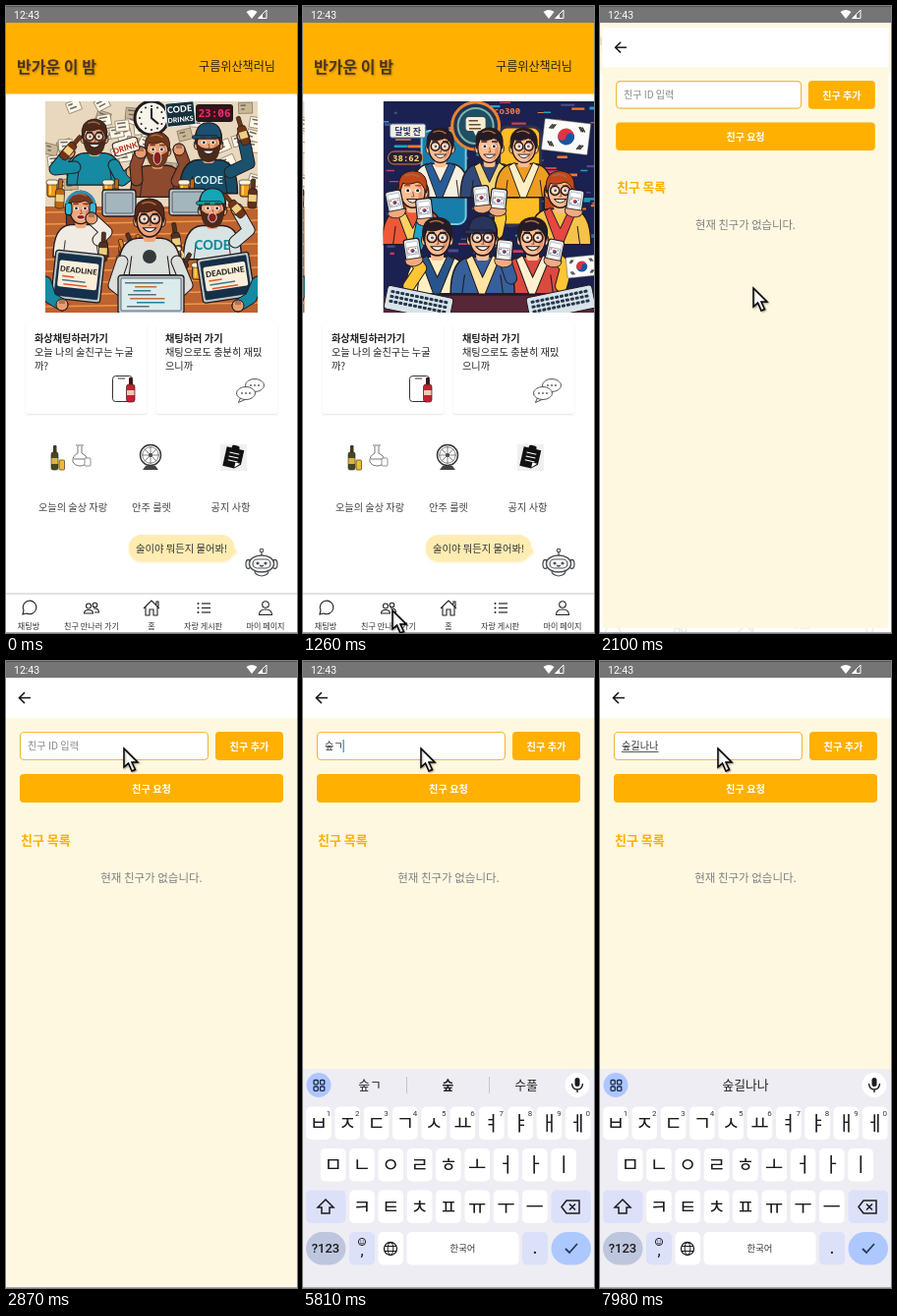
These frames come from a looping animation (296 by 638 pixels, 8 s). An HTML page with a canvas:

```html
<!DOCTYPE html>
<html lang="ko">
<head>
<meta charset="utf-8">
<style>
html, body { margin: 0; width: 100%; height: 100%; overflow: hidden; background: #fff; }
canvas { display: block; width: 296px; height: 638px; }
</style>
</head>
<body>
<canvas id="stage"></canvas>
<script>
const W = 296, H = 638, LOOP = 8000, STEP = 70;
const canvas = document.getElementById('stage');
const dpr = Math.max(1, window.devicePixelRatio || 1);
canvas.width = W * dpr;
canvas.height = H * dpr;
const c = canvas.getContext('2d');
const KR = '"Noto Sans CJK KR", "Noto Sans CJK", "Noto Sans", sans-serif';
const ROBOTO = 'Roboto, sans-serif', LATO = 'Lato, sans-serif', MONO = '"Noto Sans Mono", monospace';
const ORANGE = '#ffb000', CREAM = '#fff8e1', INK = '#241a1c';

const clamp = v => Math.max(0, Math.min(1, v));
const progress = (t, a, b) => clamp((t - a) / (b - a));
const easeOut = (p, n) => 1 - (1 - p) ** n;

function paint(fill, stroke, lw = 1) {
  if (fill) { c.fillStyle = fill; c.fill(); }
  if (stroke) { c.strokeStyle = stroke; c.lineWidth = lw; c.stroke(); }
}
function box(x, y, w, h, r, fill, stroke, lw) {
  c.beginPath(); c.roundRect(x, y, w, h, r); paint(fill, stroke, lw);
}
function oval(x, y, rx, ry, fill, stroke, lw) {
  c.beginPath(); c.ellipse(x, y, rx, ry, 0, 0, 7); paint(fill, stroke, lw);
}
const dot = (x, y, r, fill, stroke, lw) => oval(x, y, r, r, fill, stroke, lw);
function poly(pts, fill, stroke, lw, open) {
  c.beginPath();
  for (let i = 0; i < pts.length; i += 2) c.lineTo(pts[i], pts[i + 1]);
  if (!open) c.closePath();
  paint(fill, stroke, lw);
}
const line = (pts, color, lw = 1) => poly(pts, null, color, lw, true);
function path(d, fill, stroke, lw) {
  const p = new Path2D(d);
  if (fill) { c.fillStyle = fill; c.fill(p); }
  if (stroke) { c.strokeStyle = stroke; c.lineWidth = lw || 1; c.stroke(p); }
}
function text(s, x, y, size, color, align = 'left', weight = 400, family = KR) {
  c.font = `${weight} ${size}px ${family}`;
  c.textAlign = align;
  c.fillStyle = color;
  c.fillText(s, x, y);
}
function at(x, y, draw, scale = 1, turn = 0) {
  c.save(); c.translate(x, y); c.rotate(turn); c.scale(scale, scale); draw(); c.restore();
}
function shadowed(color, blur, dx, dy, draw) {
  c.save();
  c.shadowColor = color; c.shadowBlur = blur * dpr;
  c.shadowOffsetX = dx * dpr; c.shadowOffsetY = dy * dpr;
  draw();
  c.restore();
}
function seeded(n) {
  return () => (n = (n * 16807) % 2147483647) / 2147483647;
}

// ---- Illustrations, each 216 x 216 ----
function person(x, y, r, o) {
  at(x, y, () => {
    const skin = o.skin || '#f0a67b', hair = o.hair || '#4a2a1c';
    if (o.long) box(-13, -10, 26, 33, 10, hair, INK);
    path('M-25 43 Q-25 15 -9 14 L9 14 Q25 15 25 43Z', o.shirt, INK, 1.2);
    line([-16, 43, -14, 28], INK, .8); line([16, 43, 14, 28], INK, .8);
    if (o.collar) poly([-8, 13, 0, 30, 8, 13, 13, 16, 2, 43, -3, 43, -13, 16], o.collar, INK, .8);
    box(-5, 7, 10, 10, 3, skin);
    oval(-10, 1, 2.5, 4, skin, INK, .8); oval(10, 1, 2.5, 4, skin, INK, .8);
    oval(0, 0, 10, 13, skin, INK, 1.2);
    path('M3 -10 Q9 -4 8 5 Q5 10 3 11 Q7 0 3 -10Z', '#b8593b66');
    if (o.beard) path('M-10 0 Q-10 16 0 16 Q10 16 10 0 Q5 5 0 4 Q-5 5 -10 0Z', hair);
    path('M-11 1 Q-14 -16 0 -17 Q14 -16 11 1 Q8 -7 4 -8 Q-4 -5 -8 -7Z', hair, INK, .8);
    path('M-6 -13 Q0 -16 5 -12', null, '#ad6c3c', 1.2);
    if (o.hat) {
      path('M-11 -5 Q-11 -18 0 -18 Q11 -18 11 -5Z', o.hat, INK, 1);
      box(-14, -7, 22, 3, 1.5, o.hat, INK, .7);
    }
    line([0, 0, 1, 4, -1, 4], '#944f32', .8);
    for (const s of [-1, 1]) {
      oval(s * 4, -1, 2.3, 1.7, '#fff'); dot(s * 4, -1, 1.2, INK);
      line([s * 2, -5, s * 7, -5], hair, 1.3);
      if (o.glasses) dot(s * 4.3, -1, 3.7, '#ffffff44', INK, 1.2);
      if (o.phones) box(s * 11 - 3, -6, 6, 11, 3, '#38b6da', INK);
    }
    if (o.phones) { c.beginPath(); c.arc(0, -3, 13, 3.3, 6.1); paint(null, '#2f91b6', 2.5); }
    if (o.mouth) oval(0, 7, 3.6, o.mouth, '#8b1d20', '#fff', .7);
    else path('M-5 6 Q0 12 5 6Z', '#fff', INK, .8);
    if (o.word) text(o.word, 0, 35, 9, '#d9f4ee', 'center', 700, LATO);
  }, r);
}
function arm(pts, sleeve, skin = '#e89d70') {
  c.save();
  c.lineCap = c.lineJoin = 'round';
  line(pts, INK, 13); line(pts, sleeve, 11);
  c.restore();
  const [x, y] = pts.slice(-2);
  dot(x, y, 6, skin, INK, 1);
  for (let i = -2; i < 3; i += 2) line([x + i, y - 5, x + i, y - 1], INK, .6);
}
function mug(x, y) {
  dot(x + 9, y + 7, 4, null, '#f3d49a', 2);
  box(x, y, 10, 15, 2, '#f39a18', INK);
  box(x + 2, y + 3, 2, 10, 1, '#ffd16a');
  box(x - 1, y - 2, 12, 5, 3, '#fff3d5', INK, .6);
}
function bottle(x, y, turn, color = '#713415') {
  at(x, y, () => {
    box(-2, -14, 4, 12, 1, color, INK, .7);
    box(-4.5, -4, 9, 20, 3, color, INK, .7);
    box(-4, 2, 8, 7, 0, '#efcf83');
  }, 1, turn);
}
function laptop(x, y, w, h, turn, screen, color = '#14304a') {
  at(x, y, () => {
    box(0, 0, w, h, 3, '#b8cbd2', INK, 1.3);
    box(3, 3, w - 6, h - 6, 1, color, INK, .6);
    screen(w, h);
  }, 1, turn);
}
function codeLines(x, y, w, rows, seed, colors) {
  const rnd = seeded(seed);
  for (let i = 0; i < rows; i++) {
    const indent = rnd() * w * .25;
    box(x + indent, y + i * 4, (w - indent) * (.35 + rnd() * .6), 1.5, 0, colors[i % colors.length]);
  }
}
function deadline(w, h) {
  box(5, h * .2, w - 10, h * .55, 2, '#fbefda');
  text('DEADLINE', w / 2, h * .43, w / 6.6, '#232323', 'center', 800, LATO);
  codeLines(9, h * .51, w - 18, 3, 8, ['#e0562e', '#397b90']);
}
function drinksScene() {
  box(0, 0, 216, 216, 0, '#e9d8bd');
  const rnd = seeded(42);
  for (let i = 0; i < 45; i++) {
    const x = rnd() * 210, y = rnd() * 80;
    at(x, y, () => {
      box(0, 0, 14, 11, 0, i % 3 ? '#fff6e4' : '#cbb694', '#6d6258', .6);
      codeLines(2, 2, 10, 2, i + 9, ['#6b6868']);
    }, 1, rnd() - .5);
  }
  dot(108, 17, 17, '#f7f4ea', INK, 3);
  for (let a = 0; a < 12; a++) dot(108 + 12 * Math.sin(a * Math.PI / 6), 17 + 12 * Math.cos(a * Math.PI / 6), 1, INK);
  line([108, 7, 108, 17, 115, 23], INK, 2);
  at(137, 13, () => {
    box(-14, -12, 29, 24, 1, '#17303b', '#eee', 1);
    text('CODE', 0, -2, 9, '#fff', 'center', 800, LATO);
    text('DRINKS', 0, 8, 7, '#fff', 'center', 800, LATO);
  }, 1, -.1);
  box(154, 4, 36, 16, 2, '#391119', INK, 2);
  text('23:06', 172, 16, 11, '#e92f6d', 'center', 700, MONO);
  person(50, 37, 1.12, { shirt: '#168aa2', beard: 1, glasses: 1 });
  arm([30, 67, 10, 69, 24, 52], '#168aa2');
  bottle(27, 46, .7);
  arm([70, 65, 78, 80, 88, 72], '#168aa2');
  person(114, 50, 1.1, { shirt: '#8d4a2e', mouth: 6, hair: '#703719', beard: 1 });
  arm([93, 80, 92, 65, 97, 52], '#8d4a2e');
  arm([134, 81, 142, 65, 136, 49], '#8d4a2e');
  person(166, 43, 1.18, { shirt: '#174c68', hat: '#1c4f70', beard: 1, word: 'CODE' });
  arm([188, 72, 207, 63, 201, 35], '#1a526e');
  bottle(200, 29, -.3);
  at(82, 46, () => {
    box(-13, -7, 26, 14, 3, '#fff9e6', INK);
    text('DRINK!', 0, 4, 8, '#b22e22', 'center', 800, LATO);
  }, 1, -.3);
  box(0, 107, 216, 109, 0, '#bd6330');
  for (let y = 113; y < 216; y += 12) line([0, y, 216, y - 4], y % 24 ? '#ee9849' : '#7a3920', 1.5);
  for (const x of [2, 59, 136, 198]) { mug(x, 82); bottle(x + 13, 93, .05, x % 3 ? '#b86b15' : '#613019'); }
  laptop(58, 90, 34, 27, 0, () => {}, '#a3b6be');
  laptop(126, 89, 37, 27, 0, () => {}, '#a3b6be');
  person(36, 110, 1.12, { shirt: '#f0ece3', phones: 1, long: 1, hair: '#7b361d', mouth: 2 });
  arm([54, 141, 62, 133, 47, 119], '#f0ece3');
  person(170, 110, 1.18, { shirt: '#d7e4e3', hat: '#13a6b6', beard: 1, mouth: 4 });
  text('CODE', 170, 151, 13, '#15899a', 'center', 800, LATO);
  arm([193, 143, 207, 131, 195, 110], '#d7e4e3');
  bottle(191, 105, -.7);
  for (let i = 0; i < 16; i++) {
    const x = 58 + rnd() * 95, y = 132 + rnd() * 43;
    i % 3 ? bottle(x, y, rnd() - .5, i % 2 ? '#e28820' : '#51321f') : mug(x, y);
  }
  person(106, 121, 1.3, { shirt: '#dce0dd', glasses: 1, hair: '#582918' });
  dot(106, 158, 7, '#34393b');
  arm([78, 163, 70, 187, 84, 198], '#dce0dd');
  arm([134, 163, 144, 187, 132, 198], '#dce0dd');
  laptop(11, 151, 50, 49, .11, deadline);
  laptop(154, 161, 53, 45, -.15, deadline);
  laptop(74, 177, 67, 39, 0, (w, h) => codeLines(7, 7, w - 15, 7, 5, ['#56727d', '#c16d32', '#267f9b']), '#dcebec');
  arm([0, 184, 5, 200, 17, 207], '#168aa2');
  arm([216, 184, 209, 200, 196, 208], '#168aa2');
}
function flag(x, y, w, turn = 0) {
  at(x, y, () => {
    const h = w * .68, r = w * .18;
    box(-w / 2, -h / 2, w, h, 1, '#fbfbf8', '#555', .5);
    c.beginPath(); c.arc(0, 0, r, Math.PI, 0); paint('#df3443');
    c.beginPath(); c.arc(0, 0, r, 0, Math.PI); paint('#1b55a0');
    dot(-r / 2, 0, r / 2, '#df3443'); dot(r / 2, 0, r / 2, '#1b55a0');
    for (const sx of [-1, 1]) for (const sy of [-1, 1])
      for (let k = -1; k < 2; k++)
        at(sx * w * .32 + k * w * .035, sy * h * .28, () => box(-.4, -h * .09, w * .025, h * .18, 0, '#202020'), 1, sx * sy * .6);
  }, 1, turn);
}
function flagPhone(x, y, turn) {
  at(x, y, () => {
    box(-8, -13, 16, 26, 3, '#e9edf0', INK, 1.2);
    box(-6, -10, 12, 20, 1, '#fff', '#879aad', .5);
    flag(0, -1, 11);
    path('M-9 7 Q-10 14 0 15 Q10 14 9 7Z', '#f0aa80', INK, .8);
  }, 1, turn);
}
function friendsScene() {
  box(0, 0, 216, 216, 0, '#1b2150');
  const rnd = seeded(77), neon = ['#24a2bd', '#ef7a35', '#4e4c8a', '#c64358'];
  for (let i = 0; i < 130; i++) box(rnd() * 216, rnd() * 155, 3 + rnd() * 14, 1 + rnd() * 2, 0, neon[i % 4]);
  box(39, 30, 45, 95, 8, '#197dac', '#74cce0', 2);
  box(118, 26, 42, 100, 8, '#ffbd25', '#32314b', 3);
  dot(94, 25, 24, '#24334f', '#e98435', 3);
  dot(94, 25, 18, '#214e61', '#79b7b3', 2);
  box(84, 16, 20, 14, 3, '#f6ecd2'); poly([91, 29, 97, 29, 94, 35], '#f6ecd2');
  codeLines(87, 19, 14, 3, 4, ['#694c35']);
  text('co300', 126, 13, 9, '#ff753d', 'center', 700, MONO);
  box(7, 23, 36, 14, 2, '#f6efdd', '#5775b4');
  text('달빛 잔', 25, 34, 9, '#263765', 'center', 700);
  box(5, 51, 35, 13, 6, '#291f35', '#e37c39');
  text('38:62', 23, 61, 9, '#ffd66e', 'center', 700, MONO);
  flag(186, 36, 47, .12);
  const group = (list, y, r) => list.forEach(([x, shirt, collar, long, glasses, hat]) =>
    person(x, y, r, { shirt, collar, long, glasses, hat, skin: '#ffbd91', hair: long ? '#c3471b' : '#251b26' }));
  group([[58, '#f5f0df', '#285c98', 0, 1], [108, '#314978', '#f3d47a', 0, 0], [143, '#ee9d21', '#fff0c3', 0, 1]], 47, 1.18);
  group([[30, '#ee5937', '#ffd262', 1, 0], [180, '#f5c34a', '#e74642', 1, 1]], 92, 1.25);
  arm([35, 147, 39, 127, 42, 115], '#22a2c8'); flagPhone(42, 112, -.1);
  arm([116, 134, 119, 119, 117, 106], '#ffcb3a'); flagPhone(117, 102, .1);
  flagPhone(100, 99, -.1); flagPhone(195, 103, .15); flagPhone(12, 104, -.2);
  group([[55, '#fff0c4', '#28548d', 0, 1], [152, '#da4a40', '#fff0cf', 0, 1], [101, '#365f9c', '#ffe4a2', 0, 1, '#29345d']], 140, 1.3);
  arm([26, 188, 38, 170, 29, 157], '#ffc535'); flagPhone(30, 153, -.15);
  arm([130, 180, 126, 168, 123, 157], '#365f9c'); flagPhone(123, 154, .1);
  arm([181, 188, 186, 169, 174, 157], '#ffc535'); flagPhone(174, 154, .2);
  flag(202, 168, 31, -.1);
  box(0, 198, 216, 18, 0, '#572637');
  for (const [x, turn] of [[5, .2], [145, -.2]])
    at(x, turn > 0 ? 187 : 200, () => {
      box(0, 0, 68, 24, 3, '#d8e3ea', INK);
      for (let i = 0; i < 36; i++) box(4 + (i % 12) * 5, 4 + Math.floor(i / 12) * 5, 4, 3, 1, '#253649');
    }, 1, turn);
}

// ---- Home ----
function bubble(x, y, rx, ry) {
  oval(x, y, rx, ry, '#fff', '#555', 1);
  line([x - rx * .6, y + ry * .8, x - rx * .8, y + ry + 3, x - rx * .1, y + ry], '#555', 1);
  for (let i = -1; i < 2; i++) dot(x + i * 4, y, .9, '#555');
}
function homeIcons() {
  box(108.5, 376.5, 20, 26, 3, '#fff', '#333', 1);
  line([114, 379, 121, 379], '#333', 1);
  box(125, 378, 3.5, 9, 1, '#3c1519'); box(122.5, 385, 8.5, 18, 2.5, '#c51f32', '#4c171c', .7);
  box(123, 391, 7.5, 5, 0, '#f2c8b0');
  bubble(253, 386, 9.5, 6.5); bubble(244, 394, 9.5, 6.5);
  box(48, 447, 3.5, 9, 1, '#47371d'); box(46, 454, 7, 18, 2, '#4b4820', '#222', .6);
  box(46.3, 460, 6.4, 6, 0, '#d9b545'); box(54, 462, 5.5, 10, 1, '#efbd31', '#5c4a24', .8);
  path('M71 447 H79 M73 448 V455 Q67 458 68 464 Q70 468 75 468 Q82 468 83 462 Q82 457 77 455 V448 M69 461 H82', null, '#777', 1);
  box(80, 460, 6, 8, 1, '#fff', '#777', .8);
  dot(147, 457, 10.5, '#fff', '#333', 1.4); dot(147, 457, 8.2, null, '#555', .7); dot(147, 457, 2, '#333');
  for (let i = 0; i < 8; i++) {
    const a = i * Math.PI / 4;
    line([147, 457, 147 + 9 * Math.cos(a), 457 + 9 * Math.sin(a)], '#555', .7);
  }
  poly([142, 468, 152, 468, 155, 472, 139, 472], '#444');
  box(218, 446, 27, 27, 0, '#f0f0f0');
  at(231.5, 459, () => {
    poly([-9, -9, 9, -9, 9, 6, 3, 11, -9, 11], '#111');
    box(-4, -12, 8, 5, 2, '#111');
    for (const y of [-4, 0, 4]) line([-5, y, 5, y], '#fff', 1);
    poly([3, 5, 8, 5, 3, 10], '#fff');
  }, 1, .22);
}
function robot() {
  const g = '#4b5054';
  line([260, 555, 260, 560], g, 1.3); dot(260, 554, 1.8, '#fff', g, 1.1);
  oval(246.5, 568, 2.5, 4.5, '#fff', g, 1.3); oval(273.5, 568, 2.5, 4.5, '#fff', g, 1.3);
  oval(260, 567.5, 12.5, 8.5, '#fff', g, 1.5);
  box(251, 563, 18, 9, 4.5, '#fff', g, 1.2);
  dot(256, 567, 1.6, g); dot(264, 567, 1.6, g);
  path('M258 569 Q260 571 262 569 M253 575 Q253 579 260 580 Q267 579 267 575', null, g, 1.2);
}
function tabBar() {
  box(0, 598, W, 40, 0, '#fff');
  line([0, 598, W, 598], '#d8d8d8', 1.5);
  const k = '#222';
  path('M17 619 L18 615 A6.800 6.800 0 1 1 21 618 Z', null, k, 1.1);
  dot(84, 610.5, 2.5, null, k, 1.1); dot(90.5, 609.5, 2.3, null, k, 1.1);
  path('M79.5 618 Q79.5 614.5 84 614.5 Q88.5 614.5 88.5 618Z M89 613 Q94.5 612.5 94.5 617 H90', null, k, 1.1);
  path('M140 613 L148 605 L156 613 M142 611 V620 H146 V614 H150 V620 H154 V611 M153 609 V606 H155 V611', null, k, 1.1);
  for (const y of [608, 612.5, 617]) { dot(195.5, y, 1, k); line([199, y, 208, y], k, 1.2); }
  dot(264, 609, 3.3, null, k, 1.1);
  path('M257.5 619.5 Q257.5 614 264 614 Q270.5 614 270.5 619.500Z', null, k, 1.1);
  [['채팅방', 23], ['친구 만나러 가기', 87], ['홈', 148], ['자랑 게시판', 200.5], ['마이 페이지', 264]]
    .forEach(([s, x]) => text(s, x, 634, 8.1, '#333', 'center'));
}
function home(t) {
  box(0, 0, W, H, 0, '#fff');
  box(0, 17, W, 72.5, 0, ORANGE);
  shadowed('#0004', 2, 1, 1, () => text('반가운 이 밤', 11, 68, 16, '#4b3423', 'left', 700));
  text('구름위산책러님', 196, 66, 12.1, '#2b2010');
  const slide = 296 * easeOut(progress(t, 910, 1470), 2);
  [drinksScene, friendsScene].forEach((scene, i) => {
    const x = 40 + i * 296 - slide;
    if (x > W || x < -216) return;
    at(x, 97, () => { c.beginPath(); c.rect(0, 0, 216, 215); c.clip(); scene(); });
  });
  for (const x of [20, 153]) shadowed('#0000001c', 2, 0, 1, () => box(x, 323, 123, 92, 2, '#fff'));
  const lines = (x, rows) => rows.forEach((s, i) => text(s, x, 342 + i * 14, 10.2, '#222', 'left', i ? 400 : 700));
  lines(29, ['화상채팅하러가기', '오늘 나의 술친구는 누굴', '까?']);
  lines(162, ['채팅하러 가기', '채팅으로도 충분히 재밌', '으니까']);
  homeIcons();
  [['오늘의 술상 자랑', 68], ['안주 룰렛', 148], ['공지 사항', 228.5]].forEach(([s, x]) => text(s, x, 514, 10.2, '#444', 'center'));
  shadowed('#ffecb3', 3, 0, 1, () => {
    box(125, 538, 107, 27, 13, '#ffecb3');
    poly([229, 547, 235, 556, 229, 559], '#ffecb3');
  });
  text('술이야 뭐든지 물어봐!', 132, 556, 10.3, '#333');
  robot();
  tabBar();
}

// ---- Friends ----
// time, typed text, suggestions
const typing = [
  [4480, 'ㅅ', ['ㅅ', '사', '수']], [5320, '수', ['수', '수도', '수고']], [5600, '숲', ['숲', '숲을', '숲에서']],
  [5810, '숲ㄱ', ['숲ㄱ', '숲', '수풀']], [6020, '숲기', ['숲기', '숲길', '숲이']], [6160, '숲길', ['숲길', '숲길을', '숲길에']],
  [6650, '숲길ㄴ'], [6860, '숲길나'], [7140, '숲길나ㄴ'], [7280, '숲길나나']
];
const typedAt = t => typing.filter(k => k[0] <= t).pop();

function friends(t) {
  box(0, 17, W, 621, 0, CREAM);
  box(0, 17, W, 41, 0, '#fff');
  line([25, 37.5, 13.5, 37.5], '#111', 1.5);
  line([19, 32, 13.5, 37.5, 19, 43], '#111', 1.5);
  box(14.5, 72.5, 191, 28, 4, '#fff', '#f2b943', 1.2);
  const typed = typedAt(t);
  let caretX = 22.5;
  if (typed) {
    text(typed[1], 22, 90, 10.2, '#333');
    const w = c.measureText(typed[1]).width;
    caretX += w;
    if (t >= 6650) line([22, 92.5, 22 + w, 92.5], '#555', 1);
  } else text('친구 ID 입력', 22, 90, 10.2, '#888');
  const caretOn = typed ? t - typed[0] < 560 : (t >= 3220 && t < 3780) || t >= 4270;
  if (caretOn) line([caretX, 80, caretX, 93], '#5f9fc4', 1.5);
  box(213, 72, 69, 29, 4, ORANGE);
  text('친구 추가', 247.5, 91, 10.2, '#fff', 'center', 700);
  box(14, 115, 268, 29, 4, ORANGE);
  text('친구 요청', 148, 134, 10.2, '#fff', 'center', 700);
  text('친구 목록', 15, 187, 13, ORANGE, 'left', 700);
  text('현재 친구가 없습니다.', 148, 225, 11.5, '#808080', 'center');
}

function toolbar() {
  const g = '#9a9aa2', k = '#25252b';
  path('M54 425 H67 V434 L62 439 H54Z M62 439 V434 H67', null, g, 1.4);
  dot(58, 430, 1, g); dot(63, 430, 1, g); path('M57 433 Q60 437 63 433', null, g, 1.2);
  text('GIF', 104, 436, 11, g, 'center', 800, ROBOTO);
  box(142.5, 426, 11, 13, 1, null, k, 1.6); box(145, 424, 6, 4, 1, k);
  for (const y of [431, 434]) line([145, y, 151, y], k, 1.2);
  for (let i = 0; i < 4; i++) at(192, 432, () => box(-1.7, -7, 3.4, 14, 1, k), 1, i * Math.PI / 4);
  dot(192, 432, 5, k); dot(192, 432, 2.2, '#eeedf4');
  dot(236, 432, 7, k);
  for (const [x, y] of [[232, 432], [234, 428.5], [238, 428.5], [240, 432]]) dot(x, y, 1.1, '#eeedf4');
  dot(239, 437.5, 2.5, '#eeedf4');
}
function suggestions([, word, options]) {
  if (!options) return text(word, 148, 436, 12.8, '#222', 'center');
  options.forEach((s, i) => text(s, 68 + i * 79.5, 436, 12.8, '#222', 'center', i === 1 ? 700 : 400));
  for (const x of [105.5, 189.5]) line([x, 423, x, 440], '#c4c4cc', 1);
}
function keyRow(keys, firstX, y, numbered) {
  [...keys].forEach((s, i) => {
    const x = firstX + i * 29.3;
    box(x - 12.8, y, 25.6, 33.5, 5, '#fff');
    text(s, x, y + 24, 20, '#1b1b20', 'center');
    if (numbered) text((i + 1) % 10, x + 10, y + 9, 8, '#333', 'center', 400, ROBOTO);
  });
}
function keyboard(t) {
  const pale = '#dce1f9', k = '#1b1b20';
  box(0, 415, W, 223, 0, '#eeedf4');
  dot(16, 431.5, 12.5, '#adc6ff');
  for (const x of [11, 17.5]) for (const y of [426.5, 433]) box(x, y, 4.3, 4.3, 1, null, '#1d2b4c', 1.3);
  dot(279, 431.5, 12.5, '#fff');
  box(276.5, 424, 5, 9, 2.5, k);
  path('M273.5 430 Q274 436 279 436 Q284 436 284.5 430 M279 436 V439', null, k, 1.4);
  const typed = typedAt(t);
  typed ? suggestions(typed) : toolbar();
  keyRow('ㅂㅈㄷㄱㅅㅛㅕㅑㅐㅔ', 16, 453.5, true);
  keyRow('ㅁㄴㅇㄹㅎㅗㅓㅏㅣ', 30.7, 496);
  keyRow('ㅋㅌㅊㅍㅠㅜㅡ', 60, 538.5);
  box(3, 538.5, 40.5, 33.5, 5, pale);
  path('M23 548 L31 556 H27 V562 H19 V556 H15Z', null, k, 1.5);
  box(252.5, 538.5, 40.5, 33.5, 5, pale);
  path('M263 555.5 L268 549 H281 V562 H268Z M271 552.5 L277 558.5 M277 552.5 L271 558.5', null, k, 1.5);
  box(3, 581, 40.5, 33.5, 17, '#bdc6dd');
  text('?123', 23, 602, 13, k, 'center', 500, ROBOTO);
  box(47, 581, 26, 33.5, 5, pale);
  dot(60, 591, 3.6, null, k, 1); dot(58.7, 590, .6, k); dot(61.3, 590, .6, k);
  path('M58 592 Q60 594 62 592', null, k, .8);
  text(',', 60, 605, 16, k, 'center', 400, ROBOTO);
  box(76.5, 581, 25.5, 33.5, 5, '#fff');
  dot(89, 598, 6.5, null, k, 1.3); oval(89, 598, 2.8, 6.5, null, k, 1);
  line([83, 595.5, 95, 595.5], k, 1); line([83, 600.5, 95, 600.5], k, 1);
  box(105.5, 581, 114, 33.5, 5, '#fff');
  text('한국어', 162.5, 601, 9.4, '#333', 'center');
  box(223, 581, 26, 33.5, 5, pale);
  text('.', 236, 603, 16, k, 'center', 500, ROBOTO);
  box(252.5, 581, 40.5, 33.5, 17, '#adc8ff');
  line([267, 598, 271, 602, 279, 593], '#263b63', 1.8);
}

// ---- Overlays ----
function statusBar() {
  box(0, 0, W, 17, 0, '#757575');
  line([0, .5, W, .5], '#555', 1);
  text('12:43', 8, 13, 10.5, '#fff', 'left', 400, ROBOTO);
  path('M244.5 6 Q250 2 255.5 6 L250 13Z', '#fff');
  poly([265, 4, 265, 12.5, 256.5, 12.5], null, '#fff', 1);
  poly([261, 8, 261, 12.5, 256.5, 12.5], '#fff');
  line([0, 637.5, W, 637.5], '#aaa', 1);
}
const cursorStops = [[630, 90, 614], [1750, 90, 614], [2100, 155, 286], [2450, 135, 118], [2870, 119, 88], [LOOP, 119, 88]];
function cursor(t) {
  const i = cursorStops.findIndex(s => s[0] > t);
  if (i < 1) return;
  const [t0, x0, y0] = cursorStops[i - 1], [t1, x1, y1] = cursorStops[i];
  const p = progress(t, t0, t1);
  at(x0 + (x1 - x0) * p, y0 + (y1 - y0) * p, () => shadowed('#0005', 2, 1, 1, () =>
    poly([1, 1, 1, 20, 5.5, 16, 9, 24, 12.5, 22.5, 9, 15, 15, 15], '#fff', '#000', 1.5)));
}
function layer(scale, alpha, draw) {
  c.save();
  c.globalAlpha = alpha;
  c.translate(W / 2, 328); c.scale(scale, scale); c.translate(-W / 2, -328);
  draw();
  c.restore();
}
function render(t) {
  c.setTransform(dpr, 0, 0, dpr, 0, 0);
  box(0, 0, W, H, 0, '#fff');
  const open = easeOut(progress(t, 1890, 2290), 3);
  if (open < 1) layer(1 + .1 * open, 1 - open, () => home(t));
  if (open > 0) layer(.85 + .15 * open, Math.min(1, open * 1.5), () => friends(t));
  const rise = easeOut(progress(t, 3040, 3500), 2);
  if (rise > 0) at(0, 223 * (1 - rise), () => keyboard(t));
  statusBar();
  cursor(t);
}
function frame(now) {
  render(Math.floor((now % LOOP) / STEP) * STEP);
  requestAnimationFrame(frame);
}
requestAnimationFrame(frame);
</script>
</body>
</html>
```
